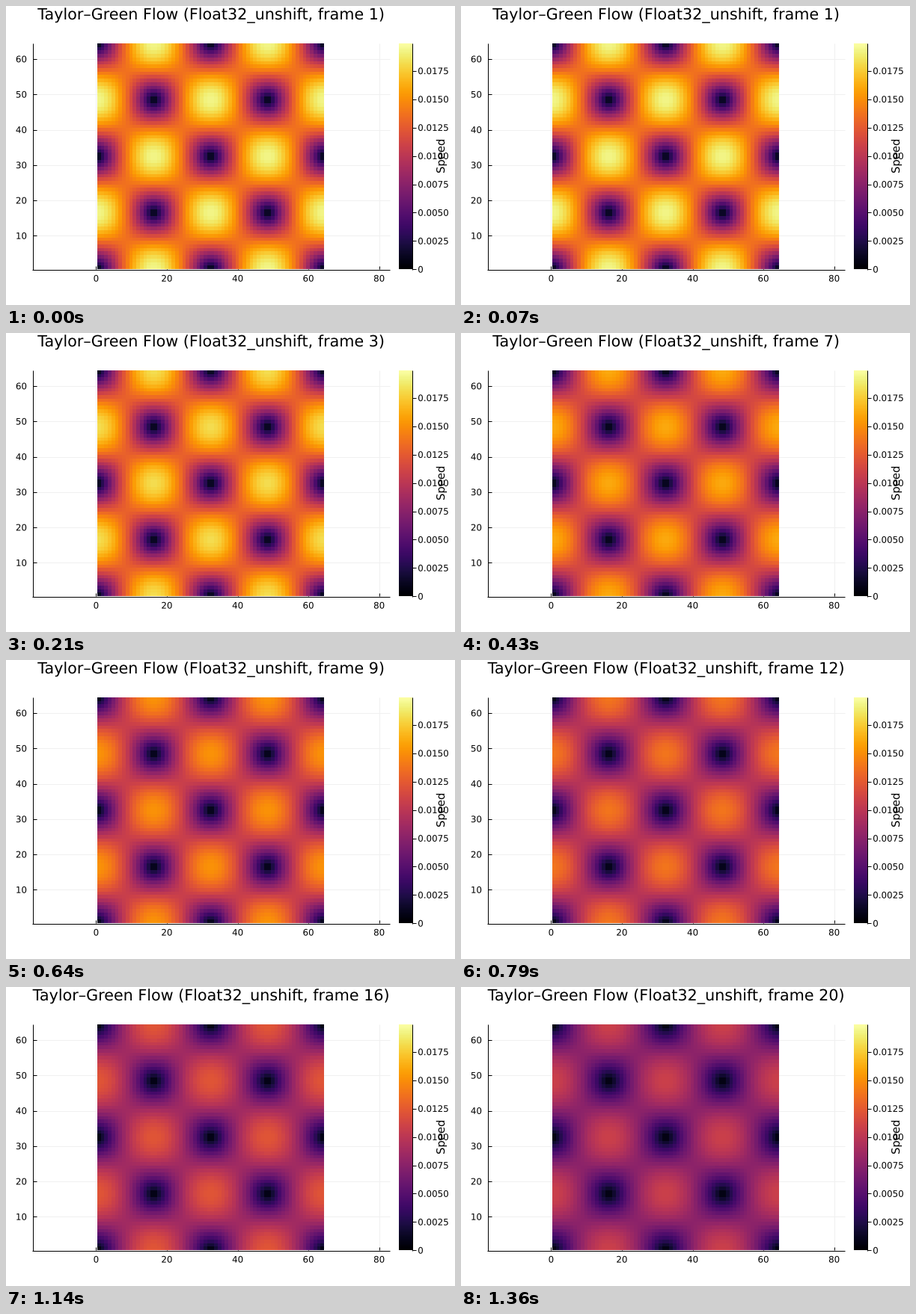
These frames come from a looping animation (600x400 px, 1430 ms). A matplotlib script:

```python
import numpy as np
import matplotlib.pyplot as plt
from matplotlib.animation import FuncAnimation
from matplotlib.patches import PathPatch
from matplotlib.textpath import TextPath
from matplotlib.transforms import Affine2D

plt.rcParams["font.family"] = "DejaVu Sans"

W, H = 600, 400
FRAMES, LOOP_MS = 20, 1430
N = 64                        # grid cells per side
DECAY = 0.97                  # speed kept per step
VMAX = 0.01994
LEFT, RIGHT, TOP, BOTTOM = 35.5, 512.5, 50, 352
CELL = 4.728                  # pixels per data unit
TITLE, GUIDE, TICK = 20.7, 14.8, 11.86   # font sizes in pixels

fig = plt.figure(figsize=(W / 100, H / 100), dpi=100, facecolor="white")
ax = fig.add_axes([0, 0, 1, 1])
ax.axis("off")


def text_path(s, x, y, size, align=0.5, angle=0):
    """Outline of s with its baseline at y; align runs from 0 (left) to 1 (right)."""
    path = TextPath((0, 0), s, size=size)
    box = path.get_extents()
    anchor = box.x0 + align * box.width
    move = Affine2D().translate(-anchor, 0).rotate_deg(angle)
    return move.scale(1, -1).translate(x, y).transform_path(path)


def label(*args, **kwargs):
    patch = PathPatch(text_path(*args, **kwargs), fc="black", lw=0, zorder=5)
    return ax.add_patch(patch)


def line(xs, ys, color="black", z=2):
    ax.plot(xs, ys, color=color, lw=0.72, zorder=z, solid_capstyle="butt")


def px(v):
    return 120.4 + CELL * v


def py(v):
    return 352.3 - CELL * (v - 0.5)


# Axes, grid and tick labels
for v in range(0, 81, 20):
    x = px(v)
    line([x, x], [TOP, BOTTOM], "#f0f0f0", 1)
    line([x, x], [BOTTOM - 4, BOTTOM])
    label(str(v), x, 368.6, TICK)
for v in range(10, 61, 10):
    y = py(v)
    line([LEFT, RIGHT], [y, y], "#f0f0f0", 1)
    line([LEFT, LEFT + 5], [y, y])
    label(str(v), 27.2, y + 4.3, TICK, align=1)
line([LEFT, LEFT], [TOP, BOTTOM + 0.5])
line([LEFT - 0.5, RIGHT + 0.5], [BOTTOM + 0.5] * 2)

# Colour bar
ramp = np.linspace(1, 0, 256)[:, None]
ax.imshow(ramp, cmap="inferno", extent=[525, 543, BOTTOM, TOP],
          interpolation="nearest", aspect="auto", zorder=3)
line([542.5, 542.5], [TOP, BOTTOM + 0.5], z=4)
for k in range(8):
    y = 352.3 - k * 0.0025 / VMAX * 302.5
    line([543, 548], [y, y], z=4)
    label(f"{k * 0.0025:.4f}" if k else "0", 551, y + 4.3, TICK, align=0)
label("Speed", 586, 201, GUIDE, angle=90)

# Speed field of the decaying vortices
phase = 2 * np.pi * (np.arange(1, N + 1) - 0.5) / N
X, Y = np.meshgrid(phase, phase)
speed = np.hypot(np.cos(X) * np.sin(Y), np.sin(X) * np.cos(Y))
field = ax.imshow(speed[::-1], cmap="inferno", vmin=0, vmax=1,
                  extent=[122, 425, BOTTOM, TOP], interpolation="nearest",
                  aspect="auto", zorder=3)
title = label("Taylor", 273.2, 18, TITLE)

ax.set_xlim(0, W)
ax.set_ylim(H, 0)


def update(i):
    step = i + 1
    field.set_data(speed[::-1] * DECAY ** step)
    text = f"Taylor–Green Flow (Float32_unshift, frame {step})"
    title.set_path(text_path(text, 273.2, 18, TITLE))
    return field, title


anim = FuncAnimation(fig, update, frames=FRAMES, interval=LOOP_MS / FRAMES,
                     repeat=True, repeat_delay=0, blit=False)
plt.show()
```
